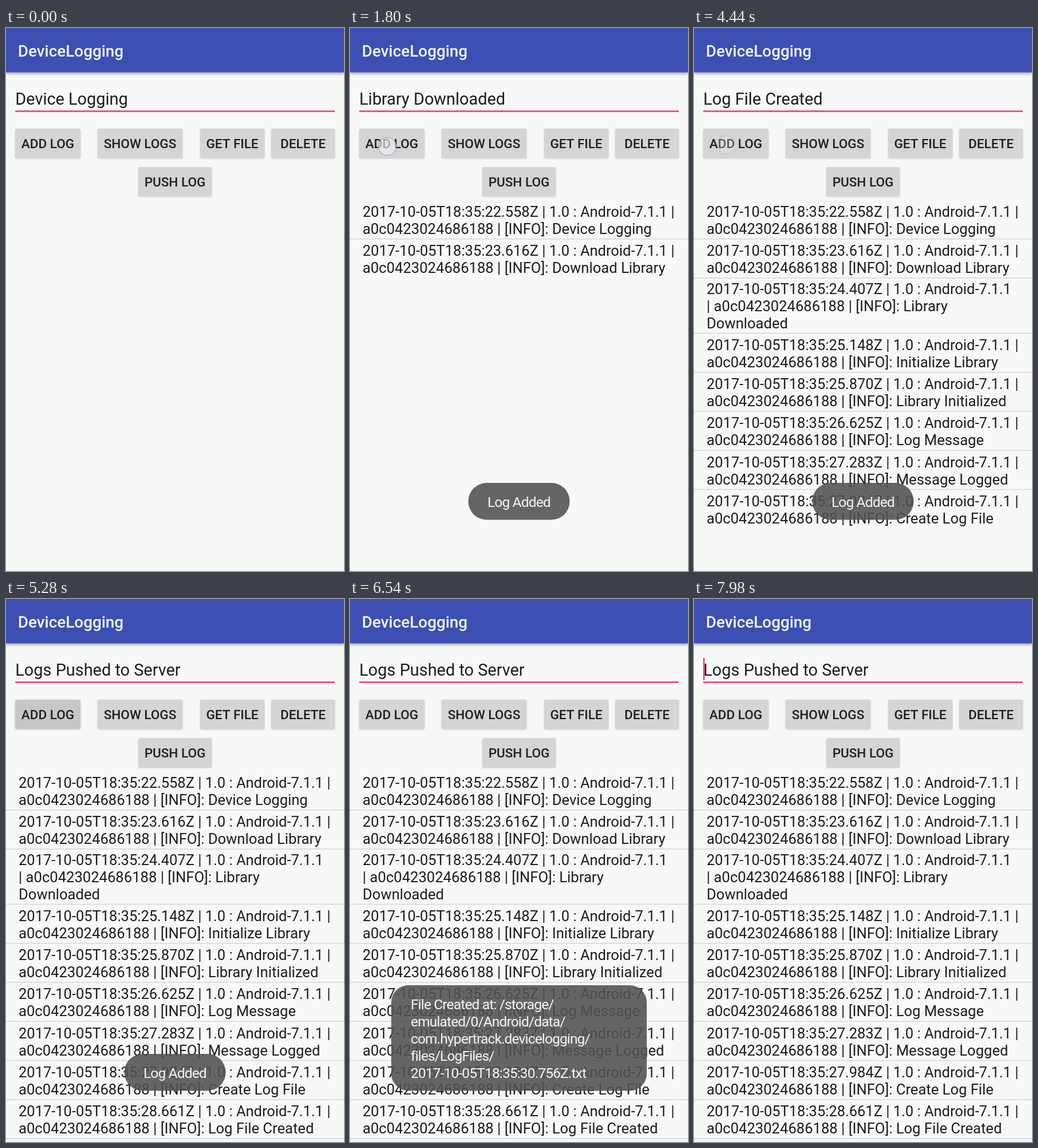
An HTML page with a canvas that plays this animation: 590x949 px, repeating every 8 s.

```html
<!DOCTYPE html>
<html lang="en">
<head>
<meta charset="utf-8">
<title>Device logging</title>
<style>
  html, body { margin: 0; width: 100%; height: 100%; overflow: hidden; background: #f7f9f7; }
  canvas { display: block; }
</style>
</head>
<body>
<canvas id="stage" width="590" height="949"></canvas>
<script>
const ctx = document.getElementById('stage').getContext('2d');
const LOOP = 8000;
const SPEED = 0.63;          // screen time per second of logged time
const GET_FILE_AT = 5830;
const FONT = 'Roboto, "Liberation Sans", sans-serif';
const INK = '#1c1d1c';

const messages = [
  'Device Logging', 'Download Library', 'Library Downloaded', 'Initialize Library',
  'Library Initialized', 'Log Message', 'Message Logged', 'Create Log File',
  'Log File Created', 'Push Logs to Server', 'Logs Pushed to Server'
];
const stamps = ['22.558', '23.616', '24.407', '25.148', '25.870', '26.625', '27.283', '27.984', '28.661'];
const addTimes = stamps.map(s => 1830 + (s - 24.407) * 1000 * SPEED).concat(5080);

const buttons = [
  { label: 'ADD LOG', x: 16, y: 176, w: 114, clicks: addTimes },
  { label: 'SHOW LOGS', x: 160, y: 176, w: 148 },
  { label: 'GET FILE', x: 339, y: 176, w: 112, clicks: [GET_FILE_AT] },
  { label: 'DELETE', x: 463, y: 176, w: 111 },
  { label: 'PUSH LOG', x: 231, y: 243, w: 128 }
];
const fileNote = [
  'File Created at: /storage/', 'emulated/0/Android/data/', 'com.hypertrack.devicelogging/',
  'files/LogFiles/', '2017-10-05T18:35:30.756Z.txt'
];

const ramp = (t, from, to) => Math.min(1, Math.max(0, (t - from) / (to - from)));
const mod = (a, b) => ((a % b) + b) % b;

function rect(x, y, w, h, color) {
  ctx.fillStyle = color;
  ctx.fillRect(x, y, w, h);
}

function roundRect(x, y, w, h, r, color) {
  ctx.fillStyle = color;
  ctx.beginPath();
  ctx.roundRect(x, y, w, h, r);
  ctx.fill();
}

function text(str, x, y, size, color = INK, weight = 400, align = 'left') {
  ctx.font = `${weight} ${size}px ${FONT}`;
  ctx.textAlign = align;
  ctx.fillStyle = color;
  ctx.fillText(str, x, y);
}

function shadow(blur, dy, color) {
  ctx.shadowBlur = blur;
  ctx.shadowOffsetY = dy;
  ctx.shadowColor = color;
}

function drawHeader() {
  ctx.save();
  shadow(5, 2, 'rgba(0,0,0,.35)');
  rect(0, 0, 590, 77.5, '#3d4fb3');
  ctx.restore();
  text('DeviceLogging', 20.8, 49.5, 27.85, '#f4f6fb', 500);
}

function drawField(t, message) {
  text(message, 16.3, 133.5, 28.9);
  rect(16, 144.2, 558, 2.6, '#ea3f80');
  const phase = mod(t - 2940, 640);
  if (phase < 120 || phase >= 440) rect(16, 103, 2.6, 39, '#ea3f80');
}

function drawButton({ label, x, y, w, clicks = [] }, t) {
  const held = Math.max(0, ...clicks.map(c => ramp(t, c, c + 60) * (1 - ramp(t, c + 220, c + 320))));
  const shade = 212 - 14 * held;
  ctx.save();
  shadow(3, 1, 'rgba(0,0,0,.22)');
  roundRect(x, y, w, 51, 3, `rgb(${shade},${shade + 1},${shade})`);
  ctx.restore();
  text(label, x + w / 2, y + 34, 22.5, INK, 500, 'center');
}

function rowBottom(i) {
  return 368.5 + 68.25 * i + (i >= 2 ? 28.25 : 0);
}

function drawLogs(count) {
  for (let i = 0; i < Math.min(count, stamps.length); i++) {
    const head = `2017-10-05T18:35:${stamps[i]}Z | 1.0 : Android-7.1.1`;
    const tail = 'a0c0423024686188 | [INFO]: ';
    const lines = i === 2
      ? [head, `| ${tail}Library`, 'Downloaded']
      : [`${head} |`, tail + messages[i]];
    const middle = (rowBottom(i - 1) + rowBottom(i)) / 2 + 10.4;
    lines.forEach((line, n) => {
      const y = middle + 30 * (n - (lines.length - 1) / 2);
      text(line, 22, y, n ? 25.6 : 25.47);
    });
    if (i + 1 < count) rect(0, rowBottom(i) - 0.5, 590, 1.5, '#d6d8d5');
  }
}

function drawTouch(x, y, click, t) {
  if (t > click + 20) return;
  ctx.save();
  ctx.globalAlpha = ramp(t, click - 100, click - 20);
  ctx.beginPath();
  ctx.arc(x, y, 15.5, 0, Math.PI * 2);
  ctx.fillStyle = 'rgba(238,240,243,.72)';
  ctx.fill();
  ctx.strokeStyle = 'rgba(150,160,195,.75)';
  ctx.lineWidth = 1.5;
  ctx.stroke();
  ctx.restore();
}

function drawToast(lines, x, y, w, h, r, textX, alpha) {
  if (alpha <= 0) return;
  ctx.save();
  ctx.globalAlpha = alpha;
  roundRect(x, y, w, h, r, 'rgba(80,82,79,.88)');
  ctx.letterSpacing = '-0.85px';
  lines.forEach((line, n) => text(line, textX, 837 - 30 * (lines.length - 1 - n), 24.5, '#f6f7f6'));
  ctx.restore();
}

function drawToasts(t, count) {
  if (count) {
    const last = addTimes[count - 1];
    const leaving = count > 1 ? 1 - ramp(t, last, last + 80) : 0;
    const entering = ramp(t, last + 60, last + 200);
    const alpha = Math.max(leaving, entering) * (1 - ramp(t, GET_FILE_AT + 20, GET_FILE_AT + 120));
    drawToast(['Log Added'], 206.5, 795, 177, 64.5, 32, 240, alpha);
  }
  const fileAlpha = ramp(t, 5960, 6110) * (1 - ramp(t, 7250, 7400));
  drawToast(fileNote, 72, 675, 446, 184.5, 30, 106, fileAlpha);
}

function draw(t) {
  const count = addTimes.filter(c => c <= t).length;
  rect(0, 0, 590, 949, '#f7f9f7');
  drawHeader();
  drawField(t, messages[count]);
  buttons.forEach(b => drawButton(b, t));
  drawLogs(count);
  drawToasts(t, count);
  addTimes.forEach((c, i) => drawTouch(i < 5 ? 65 : 57, i < 5 ? 207 : 204, c, t));
  drawTouch(395, 205, GET_FILE_AT, t);
}

function frame() {
  draw(performance.now() % LOOP);
  requestAnimationFrame(frame);
}
frame();
</script>
</body>
</html>
```
